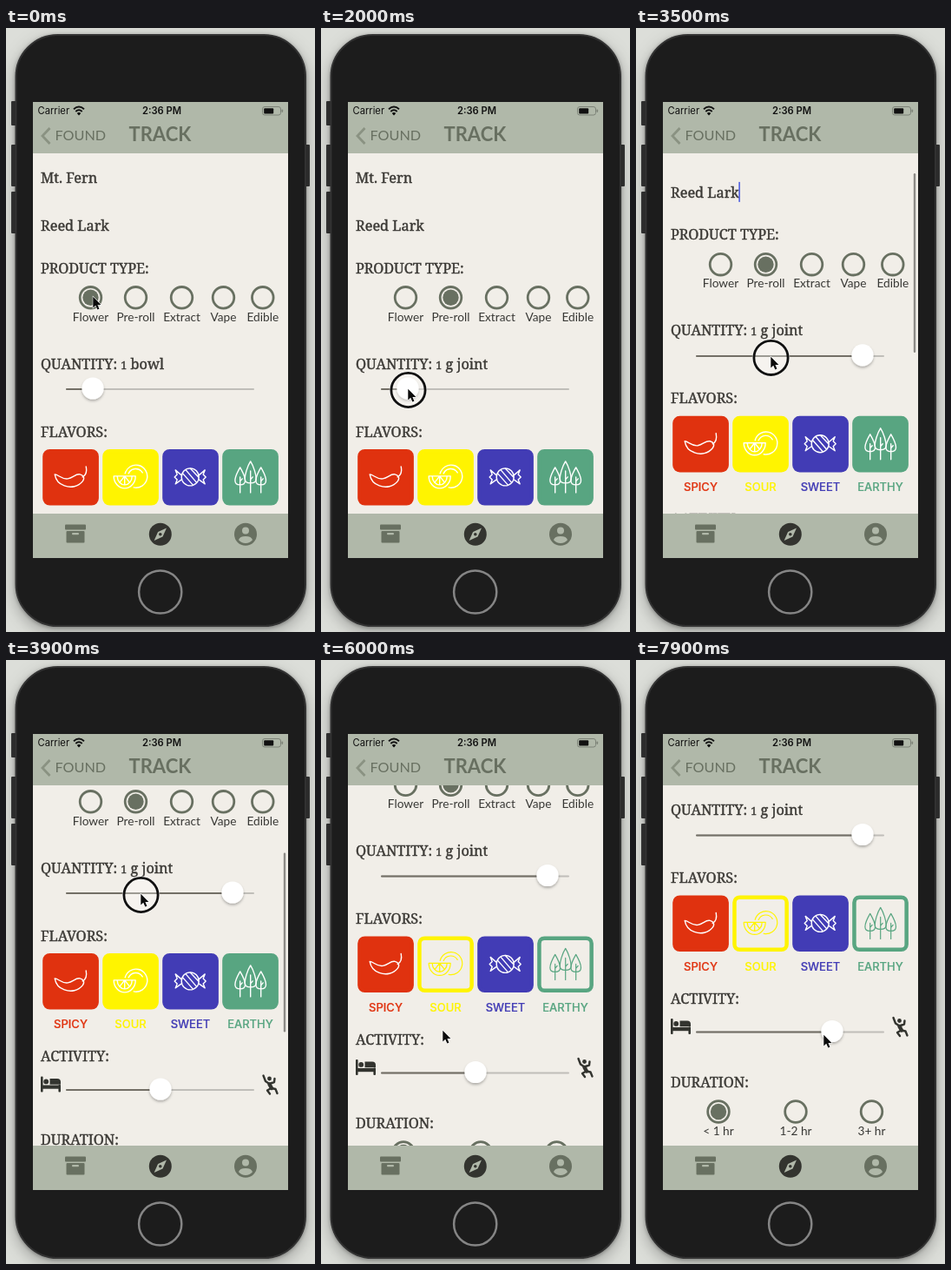
Animation, 356 px wide and 694 px high, one loop 8000 ms. Source, as an HTML page:

```html
<!DOCTYPE html>
<html lang="en">
<head>
<meta charset="utf-8">
<title>Track</title>
<style>
  html, body { margin: 0; width: 100%; height: 100%; overflow: hidden; background: #dcded9; }
  svg { display: block; }
  text { white-space: pre; }
  .head { font: 500 16.3px "Noto Serif", serif; fill: #3b3935; stroke: #3b3935; stroke-width: .4; }
  .label { font: 400 13.7px Lato, sans-serif; fill: #383835; text-anchor: middle; }
  .flavor { font: 500 13px Inter, sans-serif; text-anchor: middle; }
  .nav { font-family: Lato, sans-serif; fill: #687061; }
  .status { font: 400 11.2px Inter, sans-serif; fill: #111; }
  .icon { fill: none; stroke: currentColor; stroke-width: 1.4; stroke-linecap: round; stroke-linejoin: round; }
</style>
</head>
<body>
<svg id="stage" width="356" height="694" viewBox="0 0 356 694"></svg>
<script>
const LOOP = 8000, STEP = 100;
const BAR = '#b0b8a9', PAPER = '#f1eee8', OLIVE = '#687061', DARK = '#33342f';

const rect = (x, y, w, h, fill, r = 0, more = '') =>
  `<rect x="${x}" y="${y}" width="${w}" height="${h}" rx="${r}" fill="${fill}" ${more}/>`;
const disc = (x, y, r, fill, more = '') =>
  `<circle cx="${x}" cy="${y}" r="${r}" fill="${fill}" ${more}/>`;
const text = (x, y, cls, str, more = '') =>
  `<text x="${x}" y="${y}" class="${cls}" ${more}>${str}</text>`;
const path = (d, more = '') => `<path d="${d}" ${more}/>`;

const radio = (id, x, y, label, on) =>
  `<g id="${id}">${disc(x, y, 12.3, 'none', `stroke="${OLIVE}" stroke-width="2.8"`)}
   ${disc(x, y, 9.2, OLIVE, `class="dot" visibility="${on ? 'visible' : 'hidden'}"`)}</g>
   ${text(x, y + 26.8, 'label', label)}`;

const slider = (id, y, x) =>
  rect(69, y, 217, 2, '#c0beb9', 1) + rect(69, y, x - 69, 2, '#736f66', 1, `id="${id}Fill"`) +
  disc(x, y, 12.6, '#fff', `id="${id}Knob" filter="url(#knobShade)"`);

// Icons sit in a 65 by 65 tile.
const tree = (x, top, base, w) =>
  path(`M${x} ${top}C${x + w * .6} ${top + 6} ${x + w} ${base - 9} ${x + w} ${base - 5}
    Q${x + w} ${base} ${x} ${base}Q${x - w} ${base} ${x - w} ${base - 5}
    C${x - w} ${base - 9} ${x - w * .6} ${top + 6} ${x} ${top}Z
    M${x} ${top + 11}V50M${x} ${base - 4}l2.5 -3`);
const icons = {
  chili: path('M14 29C18 29 22 35 29 34C35 33 38 28 43 29C47 30 49 33 46 37C41 43 33 45 25 42C19 40 15 35 14 29Z' +
    'M46 32C50 30 51 25 50 20'),
  lemon: path('M26 28A13 13 0 1 1 36 44M30 28A9 9 0 0 1 46 27M13 31H38A12.5 14 0 0 1 13 31Z' +
    'M17 31A8.5 10 0 0 0 34 31M25.5 31V41M25.5 31L20 38M25.5 31L31 38'),
  candy: path('M22 32A10 10 0 0 1 42 32A10 10 0 0 1 22 32Z' +
    'M22 30L15 24L17 29L14 32L17 35L15 40L22 35M42 30L49 24L47 29L50 32L47 35L49 40L42 35' +
    'M23.5 28L35 41M27 24L39 38M32 22L41.5 32'),
  trees: tree(20.5, 21, 41, 5.8) + tree(44.5, 21, 41, 5.8) + tree(32.5, 14, 39, 6.5)
};
const flavors = [
  ['SPICY', '#e0320f', 'chili'], ['SOUR', '#fff400', 'lemon'],
  ['SWEET', '#423cb5', 'candy'], ['EARTHY', '#58a581', 'trees']
];
const tile = ([name, color, icon], i) => {
  const x = 42.2 + i * 69;
  return `<g id="${name}" transform="translate(${x} 483.9)">
    ${rect(2.25, 2.25, 60.2, 60.2, color, 6, `stroke="${color}" stroke-width="4.5"`)}
    <g class="icon" color="#fff">${icons[icon]}</g></g>
    ${text(x + 32.3, 570.2, 'flavor', name, `fill="${color}" stroke="${color}" stroke-width=".2"`)}`;
};

const types = ['Flower', 'Pre-roll', 'Extract', 'Vape', 'Edible'];
const typeX = [97.5, 149.5, 202.5, 250.5, 295.8];
const spans = ['&lt; 1 hr', '1-2 hr', '3+ hr'];
const spanX = [95, 184, 271.5];

const bed = `<g fill="${DARK}">${rect(40, 625.5, 2.6, 18, DARK, 1)}${rect(40, 635.5, 23, 4.2, DARK)}
  ${rect(60.4, 635, 2.6, 8.5, DARK, 1)}${disc(46.2, 631.4, 2.9, DARK)}
  ${path('M50.5 628H59Q63 628 63 632V634.8H50.5Z')}</g>`;
const climber = `<g fill="none" stroke="${DARK}" stroke-width="2.4" stroke-linecap="round" stroke-linejoin="round">
  ${disc(303.5, 628, 2.4, DARK, 'stroke="none"')}
  ${path('M296.5 624.5L299 631L303.5 634L309 632L309.5 628M306 639L310.5 640L312.5 645M305.5 639L301 641.5L304 645.5')}
  ${path('M303.5 634.5L306 639', 'stroke-width="4.4"')}</g>`;

const page = `
  ${text(40, 178, 'head', 'Mt. Fern')}${text(40, 233, 'head', 'Reed Lark')}
  ${rect(118.3, 215, 1.6, 23, '#4f5fe0', 0, 'id="caret"')}
  ${text(40, 281.5, 'head', 'PRODUCT TYPE:')}
  ${types.map((n, i) => radio('type' + i, typeX[i], 309.8, n, !i)).join('')}
  ${text(40, 391.5, 'head', 'QUANTITY: <tspan font-size="12.5">1</tspan><tspan id="unit"> bowl</tspan>')}
  ${slider('amount', 414, 100)}
  ${text(40, 469.5, 'head', 'FLAVORS:')}${flavors.map(tile).join('')}
  ${text(40, 608.3, 'head', 'ACTIVITY:')}${bed}${climber}${slider('activity', 640, 178)}
  ${text(40, 704.3, 'head', 'DURATION:')}
  ${spans.map((n, i) => radio('span' + i, spanX[i], 732.5, n, !i)).join('')}`;

const statusBar = text(36.5, 99, 'status', 'Carrier') +
  `<g fill="none" stroke="#111" stroke-width="1.9">${path('M78 93.2Q84 87.8 90 93.2M80.3 96Q84 92.6 87.7 96')}</g>` +
  path('M81.8 98Q84 96 86.2 98L84 100.5Z') +
  text(179.5, 99, 'status', '2:36 PM', 'text-anchor="middle" style="font-weight:600"') +
  rect(295.5, 90.5, 21, 9.5, 'none', 2.5, 'stroke="#7d8378"') +
  rect(297.2, 92.2, 11, 6.2, '#111', 1) + rect(317.5, 93.5, 1.6, 3.5, '#7d8378', .8);

const navBar = path('M50.5 115L42 124L50.5 133', 'fill="none" stroke="#8a9282" stroke-width="2.8"') +
  text(56.5, 128.5, 'nav', 'FOUND', 'font-size="16.2"') +
  text(141.5, 130, 'nav', 'TRACK', 'font-size="22" font-weight="700"');

const tabs = rect(68, 570.5, 24, 6, OLIVE, 1) + rect(69.5, 578, 21, 13.5, OLIVE, 1) +
  rect(76, 580, 8, 2.2, BAR, 1) +
  disc(177.8, 581.8, 13, DARK) +
  path('M185 574.5L180.5 584.5L170.6 589L175.1 579Z', `fill="${BAR}"`) + disc(177.8, 581.8, 1.8, DARK) +
  disc(276, 581.8, 13, OLIVE) + disc(276, 577.6, 4, BAR) +
  path('M268 588.3Q269 584 276 584T284 588.3Q281 592 276 592T268 588.3Z', `fill="${BAR}"`);

document.getElementById('stage').innerHTML = `
  <defs>
    <clipPath id="view">${rect(31, 144, 294, 414, '#000')}</clipPath>
    <filter id="knobShade" x="-50%" y="-50%" width="200%" height="200%">
      <feDropShadow dx="0" dy="2" stdDeviation="1.6" flood-opacity=".28"/></filter>
    <filter id="phoneShade" x="-20%" y="-10%" width="140%" height="120%">
      <feDropShadow dx="0" dy="1" stdDeviation="2" flood-opacity=".3"/>
      <feDropShadow dx="0" dy="6" stdDeviation="9" flood-opacity=".28"/></filter>
  </defs>
  ${[[6, 84, 28], [6, 134, 48], [6, 188, 48], [343, 134, 48]].map(([x, y, h]) => rect(x, y, 7, h, '#363636', 1)).join('')}
  ${rect(11.5, 8, 333.5, 679, '#1d1d1d', 48, 'stroke="#303030" stroke-width="2" filter="url(#phoneShade)"')}
  ${disc(177.7, 648, 24.6, 'none', 'stroke="#858585" stroke-width="2.5"')}
  ${rect(31, 85, 294, 524, PAPER)}
  <g clip-path="url(#view)"><g id="page">${page}</g>${rect(319.8, 148, 2.4, 206, '#8c8a86', 1.2, 'id="thumb"')}</g>
  ${rect(31, 85, 294, 59, BAR)}${rect(31, 558, 294, 51, BAR)}
  ${statusBar}${navBar}${tabs}
  <g id="cursor">
    <g id="ring">${disc(.5, 2, 21.3, 'none', 'stroke="#fff" stroke-opacity=".6" stroke-width="1"')}
    ${disc(.5, 2, 19.6, '#fff', 'fill-opacity=".3" stroke="#111" stroke-width="2.8"')}</g>
    ${path('M0 0V14.6L3.4 11.5L5.8 17L8.2 16L5.9 10.6H10.5Z',
      'transform="translate(.3 .8) scale(.87)" fill="#0c0c0c" stroke="#fff" stroke-width="1.2" paint-order="stroke"')}
  </g>`;

// Each row: time, then values.
const pointer = [
  [0, 100, 308], [400, 100, 308], [900, 152, 305], [1300, 152, 305], [1800, 100, 414], [2000, 100, 414],
  [2500, 261, 414], [2600, 261, 414], [2900, 146, 443], [3200, 155, 415], [3300, 155, 415],
  [3900, 155, 268], [4000, 155, 268], [4500, 143, 345], [4900, 143, 345], [5300, 281, 345],
  [5600, 281, 345], [6000, 140, 425], [6100, 140, 425], [6500, 140, 378], [6600, 140, 378],
  [7000, 178, 434], [7100, 178, 434], [7600, 226, 432], [7700, 226, 432], [7900, 216, 430]
];
const scroll = [[3300, 0], [3900, 147], [4300, 166.5], [6100, 166.5], [6500, 213.5]];
const amount = [[2000, 100], [2500, 261]];
const activity = [[7100, 178], [7600, 226]];
const presses = [[1000, 1100], [1900, 2500], [3300, 4000], [4600, 4700], [5300, 5400], [6100, 6500], [7100, 7700]];
const scrolling = [[3300, 4500], [6100, 6700]];

function at(rows, t) {
  const i = rows.findIndex(r => r[0] > t);
  if (i === 0) return rows[0].slice(1);
  if (i < 0) return rows[rows.length - 1].slice(1);
  const a = rows[i - 1], b = rows[i];
  const u = (t - a[0]) / (b[0] - a[0]), e = u * u * (3 - 2 * u);
  return a.slice(1).map((v, k) => v + (b[k + 1] - v) * e);
}
const within = (ranges, t) => ranges.some(([a, b]) => t >= a && t <= b);
const $ = id => document.getElementById(id);
const set = (id, name, value) => $(id).setAttribute(name, value);
const show = (el, on) => el.setAttribute('visibility', on ? 'visible' : 'hidden');

function moveSlider(id, x) {
  set(id + 'Knob', 'cx', x);
  set(id + 'Fill', 'width', x - 69);
}

function setTile([name, color], open) {
  const box = $(name);
  box.querySelector('rect').setAttribute('fill', open ? PAPER : color);
  const icon = box.querySelector('.icon');
  icon.setAttribute('color', open ? color : '#fff');
  icon.style.strokeWidth = open ? 1.2 : 1.4;
}

function draw(t) {
  const [x, y] = at(pointer, t), [top] = at(scroll, t);
  set('cursor', 'transform', `translate(${x} ${y})`);
  show($('ring'), within(presses, t));
  set('page', 'transform', `translate(0 ${-top})`);
  set('thumb', 'y', 148 + top * .5);
  show($('thumb'), within(scrolling, t));
  show($('caret'), t % 1000 >= 100 && t % 1000 < 600);

  const rolled = t >= 1300;
  show($('type0').querySelector('.dot'), !rolled);
  show($('type1').querySelector('.dot'), rolled);
  set('type1', 'opacity', t >= 1000 && !rolled ? .2 : 1);
  $('unit').textContent = rolled ? ' g joint' : ' bowl';

  moveSlider('amount', at(amount, t)[0]);
  moveSlider('activity', at(activity, t)[0]);
  setTile(flavors[1], t >= 4700);
  setTile(flavors[3], t >= 5400);
}

const start = performance.now();
function tick() {
  const t = (performance.now() - start) % LOOP;
  draw(Math.floor(t / STEP) * STEP);
  requestAnimationFrame(tick);
}
tick();
</script>
</body>
</html>
```
